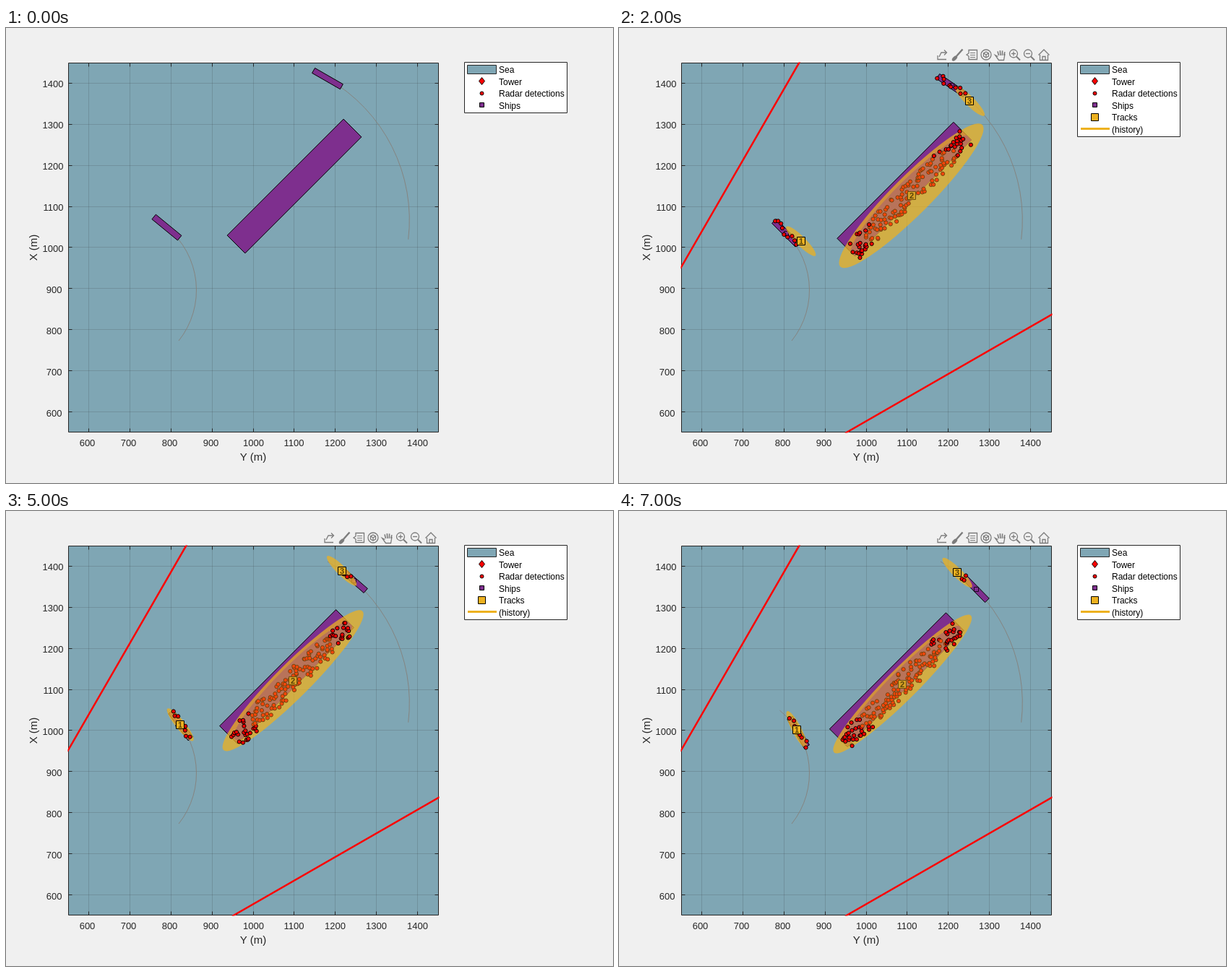
These frames come from a looping animation (840 px wide and 630 px high, 8000 ms). An HTML page with a canvas:

```html
<!DOCTYPE html>
<html lang="en">
<head>
<meta charset="utf-8">
<title>Harbour radar tracking</title>
<style>
html, body { margin: 0; width: 100%; height: 100%; overflow: hidden; background: #f0f0f0; }
canvas { display: block; }
</style>
</head>
<body>
<canvas id="stage" width="840" height="630"></canvas>
<script>
const ctx = document.getElementById('stage').getContext('2d');
const STEP_MS = 1000, STEPS = 8, FIRST_TRACK = 2, RAD = Math.PI / 180;
const SEA = '#7fa6b4', INK = '#262626', PURPLE = '#7e2f8e', GOLD = '#edb120', RED = '#ff0000', GRAY = '#7c7c7c';
const FONT = '"Liberation Sans", Arial, sans-serif';
const BOX = { x: 86.5, y: 48.5, w: 512, h: 511 };

// Small ships sail clockwise on arcs; angles are degrees above the x axis.
// A track starts ahead of its ship, falls back to `hold`, then drifts along the arc.
const WEST = {
  cx: 151, cy: 363, r: 112.5, from: 50.6, to: -38.5, rate: 2.9, len: 46, wid: 8.5,
  hold: 39, drift: 0.26, lead: 5, outward: 9, swing: 0.7, echoes: 9, fade: 0, seed: 11
};
const EAST = {
  cx: 332.3, cy: 266, r: 226, from: 60.1, to: -6.8, rate: 2.24, len: 44.8, wid: 8,
  hold: 54.8, drift: 0.07, lead: 7.7, outward: -1, swing: 0, echoes: 11, fade: 1, seed: 29
};

function random(seed) {
  return () => {
    seed = (seed + 0x6D2B79F5) | 0;
    let n = Math.imul(seed ^ (seed >>> 15), 1 | seed);
    n = (n + Math.imul(n ^ (n >>> 7), 61 | n)) ^ n;
    return ((n ^ (n >>> 14)) >>> 0) / 4294967296;
  };
}

function paint(fill, stroke, width = 1) {
  if (fill) { ctx.fillStyle = fill; ctx.fill(); }
  if (stroke) { ctx.strokeStyle = stroke; ctx.lineWidth = width; ctx.stroke(); }
}

function path(points, closed) {
  ctx.beginPath();
  points.forEach(([x, y]) => ctx.lineTo(x, y));
  if (closed) ctx.closePath();
}

function line(x1, y1, x2, y2, color, width) {
  path([[x1, y1], [x2, y2]]);
  paint(null, color, width);
}

function rect(x, y, w, h, fill, stroke) {
  ctx.beginPath();
  ctx.rect(x, y, w, h);
  paint(fill, stroke);
}

function circle(x, y, r, fill, stroke, width) {
  ctx.beginPath();
  ctx.arc(x, y, r, 0, 2 * Math.PI);
  paint(fill, stroke, width);
}

function text(str, x, y, size, align = 'center', color = INK, weight = '') {
  ctx.font = `${weight} ${size}px ${FONT}`;
  ctx.textAlign = align;
  ctx.fillStyle = color;
  ctx.fillText(str, x, y);
}

function onArc(arc, degrees, r = arc.r) {
  return { x: arc.cx + r * Math.cos(degrees * RAD), y: arc.cy - r * Math.sin(degrees * RAD) };
}

function smallShip(arc, step) {
  const phi = arc.from - arc.rate * step;
  return { ...onArc(arc, phi), angle: (90 - phi) * RAD, len: arc.len, wid: arc.wid };
}

function bigShip(step) {
  return { x: 399 - 2.1 * step, y: 219 + 2.1 * step, angle: -45 * RAD, len: 227.7, wid: 35 };
}

function smallTrack(arc, age) {
  const ahead = age === 0;
  const phi = arc.hold - arc.drift * age * age - (ahead ? arc.lead : 0);
  return { ...onArc(arc, phi, arc.r + (ahead ? arc.outward : 0)), a: 28.5, b: 6.5, angle: (45 + arc.swing * age * age) * RAD };
}

function bigTrack(age) {
  return { x: 404.5 - 2.45 * age, y: 232.3 + 0.29 * age * age, a: 139 - age, b: 26.5 - age, angle: -45 * RAD };
}

// Point at u along and v across a ship
function local(ship, u, v) {
  const c = Math.cos(ship.angle), s = Math.sin(ship.angle);
  return [ship.x + u * c - v * s, ship.y + u * s + v * c];
}

function hull(ship) {
  const u = ship.len / 2, v = ship.wid / 2;
  path([local(ship, -u, -v), local(ship, u, -v), local(ship, u, v), local(ship, -u, v)], true);
}

function ellipse(t, scale = 1) {
  ctx.beginPath();
  ctx.ellipse(t.x, t.y, t.a * scale, t.b * scale, t.angle, 0, 2 * Math.PI);
}

function drawAxes() {
  const grid = 'rgba(38,38,38,.16)', right = BOX.x + BOX.w, bottom = BOX.y + BOX.h;
  rect(BOX.x, BOX.y, BOX.w, BOX.h, SEA);
  for (let i = 0; i < 9; i++) {
    const x = Math.floor(114.45 + 56.9 * i) + 0.5, y = Math.floor(531.75 - 56.95 * i) + 0.5;
    line(x, BOX.y, x, bottom, grid);
    line(BOX.x, y, right, y, grid);
    for (const [edge, dir] of [[BOX.y, 5], [bottom, -5]]) line(x, edge, x, edge + dir, INK);
    for (const [edge, dir] of [[BOX.x, 5], [right, -5]]) line(edge, y, edge + dir, y, INK);
    const value = 600 + 100 * i, shift = value < 1000 ? 2 : 0;
    text(value, x - shift, 579, 13);
    text(value, 79.5 - shift, Math.round(537.5 - 56.95 * i), 13, 'right');
  }
  rect(BOX.x, BOX.y, BOX.w, BOX.h, null, INK);
  text('Y (m)', 342, 599, 15);
  ctx.save();
  ctx.translate(43, 304);
  ctx.rotate(-Math.PI / 2);
  text('X (m)', 0, 0, 15);
  ctx.restore();
}

function drawLegend(tracking) {
  const labels = ['Sea', 'Tower', 'Radar detections', 'Ships'];
  if (tracking) labels.push('Tracks', '(history)');
  rect(634.5, 47.5, 142, 4 + 16.5 * labels.length, '#fff', INK);
  labels.forEach((label, i) => text(label, 682, 62 + 16.6 * i, 12, 'left', '#000'));
  rect(638.5, 51.5, 40, 12, SEA, INK);
  path([[658.5, 68.5], [662.5, 73.5], [658.5, 78.5], [654.5, 73.5]], true);
  paint(RED, '#000');
  circle(658.5, 90.5, 2.5, RED, '#000');
  rect(655.5, 103.5, 6, 6, PURPLE, '#000');
  if (!tracking) return;
  rect(653.5, 118.5, 10, 10, GOLD, '#000');
  line(639, 139.5, 679, 139.5, GOLD, 3);
}

function drawToolbar() {
  const pen = (x1, y1, x2, y2, width = 1.3) => line(x1, y1, x2, y2, GRAY, width);
  const outline = (points, closed) => { path(points, closed); paint(null, GRAY, 1.3); };

  // share
  outline([[441, 38], [441, 43.5], [453, 43.5]]);
  outline([[443, 40], [446, 34], [453, 34]]);
  outline([[450, 30.5], [453.5, 34], [450, 37.5]]);
  // brush
  pen(475.5, 29.5, 467, 39, 2.4);
  ctx.beginPath();
  ctx.ellipse(464.5, 42, 4.5, 2.5, -45 * RAD, 0, 2 * Math.PI);
  paint(GRAY);
  // data tip
  outline([[484, 30.5], [495.5, 30.5], [495.5, 43.5], [484, 43.5], [484, 39], [481, 37], [484, 35]], true);
  for (let y = 34.5; y < 41; y += 3) pen(486, y, 493, y, 1);
  // rotate
  circle(508, 37, 7, null, GRAY, 1.3);
  const corners = Array.from({ length: 6 }, (_, i) => [508 + 4 * Math.sin(i * 60 * RAD), 37 - 4 * Math.cos(i * 60 * RAD)]);
  outline(corners, true);
  for (let i = 1; i < 6; i += 2) pen(508, 37, ...corners[i]);
  // hand
  for (let i = 0; i < 4; i++) pen(525.5 + 2.4 * i, 38, 524 + 3.3 * i, 31 + (i - 1.3) ** 2 * 0.8, 1.6);
  outline([[534, 36], [532.5, 44.5], [525.5, 44.5], [520.5, 37.5], [524.5, 39.5]]);
  // zoom in and out
  for (const x of [546, 566]) {
    circle(x, 35.5, 5.5, null, GRAY, 1.3);
    pen(x + 4, 39.5, x + 9, 44.5, 2);
    pen(x - 3, 35.5, x + 3, 35.5);
  }
  pen(546, 32.5, 546, 38.5);
  // home
  outline([[580.5, 37.5], [588, 30], [595.5, 37.5]]);
  outline([[582.5, 37], [582.5, 44.5], [593.5, 44.5], [593.5, 37]]);
  outline([[586, 44.5], [586, 39.5], [590, 39.5], [590, 44.5]]);
}

function drawTracks(tracks, ship) {
  for (const track of tracks) {
    ellipse(track);
    paint('rgba(237,177,32,.75)');
  }
  ctx.save();
  hull(ship);
  ctx.clip();
  ellipse(tracks[1], 0.84);
  paint('#b8735a');
  ctx.restore();
}

// Detections deep inside the cover ellipse look tinted.
function drawDot([x, y], cover) {
  let tinted = false;
  if (cover) {
    const along = (x - cover.x - y + cover.y) * Math.SQRT1_2, across = (x - cover.x + y - cover.y) * Math.SQRT1_2;
    tinted = Math.hypot(along / cover.a / 0.62, across / cover.b / 0.8) < 1;
  }
  circle(x, y, 2.6, tinted ? '#fa460a' : RED, tinted ? '#6e4410' : '#000');
}

function scatter(ship, count, lo, hi, mid, spread, seed, cover) {
  const rnd = random(seed);
  for (let i = 0; i < count; i++) {
    const u = lo + (hi - lo) * (i + rnd()) / count;
    drawDot(local(ship, u, mid + spread * (2 * rnd() - 1)), cover);
  }
}

function drawDetections(step, ships, cover) {
  scatter(ships[1], 150, -113, 111, 10, 14, 100 + step, cover);
  [WEST, EAST].forEach((arc, i) => {
    const count = Math.round(arc.echoes - 1.4 * arc.fade * (step - 1));
    const reach = arc.fade ? Math.min(24, 40 - 8.5 * step) : 24;
    scatter(ships[2 * i], count, -25, reach, 0, 4.5, arc.seed + step);
  });
}

function drawLabel(track, index) {
  const x = Math.round(track.x), y = Math.round(track.y), tinted = index === 1;
  rect(x - 5.5, y - 5.5, 11, 11, tinted ? '#d6a026' : GOLD, tinted ? '#6a5010' : '#000');
  text(index + 1, x, y + 4, 11, 'center', '#5a4408', 'bold');
}

function draw(step) {
  const scanning = step > 0, age = step - FIRST_TRACK, tracking = age >= 0;
  const ships = [smallShip(WEST, step), bigShip(step), smallShip(EAST, step)];
  const tracks = tracking ? [smallTrack(WEST, age), bigTrack(age), smallTrack(EAST, age)] : [];

  ctx.fillStyle = '#f0f0f0';
  ctx.fillRect(0, 0, 840, 630);
  drawAxes();
  drawLegend(tracking);
  if (scanning) drawToolbar();

  ctx.save();
  ctx.beginPath();
  ctx.rect(BOX.x - 1, BOX.y - 1, BOX.w + 2, BOX.h + 2);
  ctx.clip();
  for (const arc of [WEST, EAST]) {
    ctx.beginPath();
    ctx.arc(arc.cx, arc.cy, arc.r, -arc.from * RAD, -arc.to * RAD);
    paint(null, '#85807b', 0.9);
  }
  for (const ship of ships) {
    hull(ship);
    paint(PURPLE, '#000');
    if (scanning) rect(Math.round(ship.x) - 2.5, Math.round(ship.y) - 2.5, 6, 6, PURPLE, '#1a0a1e');
  }
  if (scanning) {
    line(85, 333, 250.5, 46, RED, 2.5);
    line(313, 561, 600, 396, RED, 2.5);
    if (tracking) drawTracks(tracks, ships[1]);
    drawDetections(step, ships, tracks[1]);
    tracks.forEach(drawLabel);
  }
  ctx.restore();
}

const start = performance.now();
let shown = -1;
function tick() {
  const step = Math.floor((performance.now() - start) / STEP_MS) % STEPS;
  if (step !== shown) draw(shown = step);
  requestAnimationFrame(tick);
}
tick();
</script>
</body>
</html>
```
